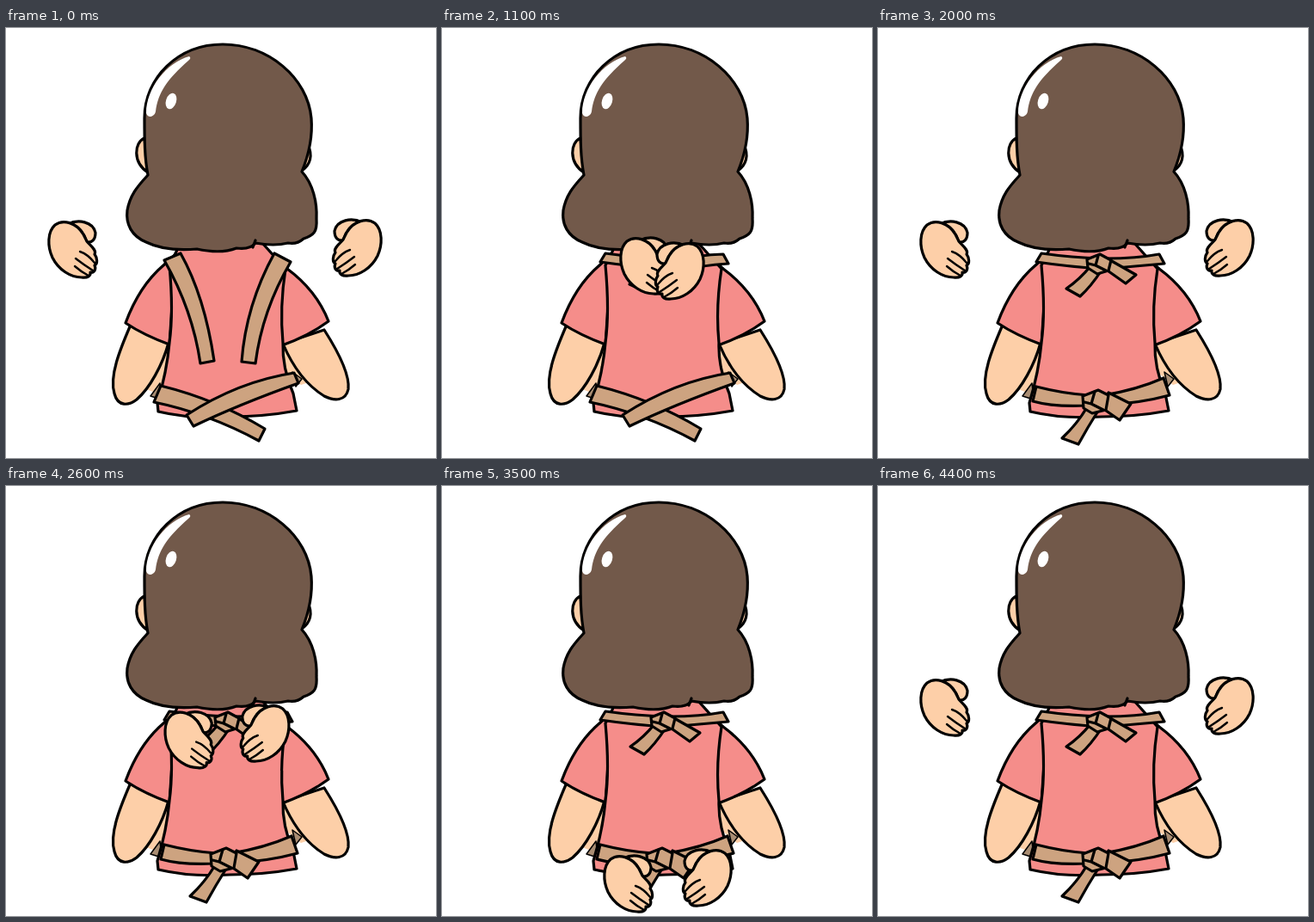
Write an HTML page that moves like this. It is 500 px wide and 500 px high and loops after 4.8 s.

```html
<!DOCTYPE html>
<html lang="en">
<head>
<meta charset="utf-8">
<title>Tying an apron</title>
<style>
  html, body { margin: 0; width: 100%; height: 100%; overflow: hidden; background: #fff; }
  svg { display: block; width: 100vw; height: 100vh; }
  .skin { fill: #fdcfa8; }
  .shirt { fill: #f58d8a; }
  .hair { fill: #72594a; }
  .strap { fill: #cda380; }
  .shade { fill: #a98d73; }
  .line { fill: none; }
</style>
</head>
<body>
<svg viewBox="0 0 500 500" stroke="#000" stroke-width="3.2" stroke-linejoin="round" stroke-linecap="round">
  <defs>
    <g id="hand" class="skin">
      <path d="M72 228C84 222 101 225 104 238C104 246 100 250 94 249Z"/>
      <path d="M90 240C82 226 66 222 57 229C48 237 48 254 54 267C61 281 75 290 88 290C95 291 99 288 98 284C103 285 105 280 103 276C107 274 106 267 103 263C106 258 97 252 94 248Z"/>
      <path class="line" stroke-width="2.4" d="M78 228Q90 234 94 248M86 260Q95 263 103 273M81 268Q90 275 101 282M80 277Q88 284 96 288"/>
    </g>
  </defs>

  <!-- arms -->
  <g class="skin">
    <path d="M188 365L190 400L176 425L163 420Z" stroke="none"/>
    <path d="M322 365L322 398L343 415L352 412Z" stroke="none"/>
    <path class="shade" d="M179 413L168 428L181 432Z" stroke-width="1.5"/>
    <path class="shade" d="M333 400L344 408L337 417Z" stroke-width="1.5"/>
    <path d="M145 345C132 375 120 405 126 425C130 441 143 439 152 432C167 419 182 392 189 366Z"/>
    <path d="M370 351C386 376 400 402 398 420C395 434 382 434 370 428C349 415 333 393 322 367Z"/>
  </g>

  <!-- shirt -->
  <g class="shirt">
    <path d="M205 256L183 276C163 293 149 316 139 343Q160 357 190 368L196 280Z"/>
    <path d="M300 256L327 280C350 297 366 318 375 341Q352 358 321 369L318 280Z"/>
    <path d="M203 250L190 276Q195 330 190 366Q187 400 176 436L177 446Q215 455 260 452Q300 452 338 445L334 425Q321 395 322 366Q318 325 325 280L298 250Z"/>
  </g>

  <!-- loose waist straps -->
  <g id="loose" class="strap">
    <path d="M180 416Q245 432 301 466L294 480Q235 448 172 435Z"/>
    <path d="M335 401Q270 411 210 450L218 463Q270 438 340 413Z"/>
  </g>

  <path id="leftStrap" class="strap"/>
  <path id="rightStrap" class="strap"/>

  <!-- bows -->
  <g id="bows" class="strap">
    <path d="M184 417Q215 425 245 427L243 439Q205 441 180 434Z"/>
    <path d="M262 427Q300 421 332 407L339 427Q302 437 264 438Z"/>
    <path d="M243 441Q232 460 214 477L233 484Q244 464 256 445Z"/>
    <path d="M258 440L281 456L294 437L268 424Z"/>
    <path d="M238 428L256 421L268 427L265 444L249 448L239 442Z"/>
    <path class="line" d="M252 423L248 437L262 444M248 437L240 435"/>
    <path d="M247 277Q235 292 219 303L235 312Q248 300 259 283Z"/>
    <path d="M264 280L288 297L300 287L270 270Z"/>
    <path d="M243 269L258 263L271 270L268 282L255 286L244 279Z"/>
    <path class="line" d="M256 265L253 276L265 282M253 276L245 274"/>
  </g>

  <!-- head -->
  <path class="skin" d="M161 128C149 133 147 156 165 168Z"/>
  <path class="skin" d="M351 136C357 148 354 159 344 166Z"/>
  <path class="hair" d="M252 19C305 19 351 58 355 105C357 130 351 150 344 167C357 181 362 203 361 222C362 237 358 241 346 245Q338 252 328 250Q312 254 290 250Q284 258 268 256Q250 263 222 257Q185 260 163 249C146 242 139 228 141 212C144 195 152 185 165 171C161 150 161 130 161 105C161 58 200 19 252 19Z"/>
  <path class="line" d="M290 247L287 255"/>
  <g fill="#fff" stroke="none">
    <path d="M213 33C187 40 163 70 163 99C165 106 173 103 174 97C177 75 187 60 212 38Q216 35 213 33Z"/>
    <ellipse cx="192" cy="85" rx="6" ry="9.5" transform="rotate(18 192 85)"/>
  </g>

  <use id="leftHand" href="#hand"/>
  <use id="rightHand" href="#hand"/>
</svg>

<script>
const LOOP = 4800, STEP = 100, TIED_AT = 1600;
const $ = id => document.getElementById(id);
const mix = (a, b, k) => a + (b - a) * k;

// time, left hand offset, right hand offset (both from the resting place)
const rest = [0, 0, 0, 0], grip = [129, 64, -97, 67], neck = [158, 19, -132, 27],
      knot = [169, 47, -134, 40], waist = [139, 205, -100, 200], apart = [116, 174, -87, 167];
const moves = [
  [0, rest], [500, grip], [600, grip], [1100, neck], [1500, neck], [2000, rest],
  [2200, rest], [2700, knot], [2900, knot], [3500, waist], [3900, apart], [4400, rest], [LOOP, rest]
];

// corner, corner, bend, end, end, bend: hanging, then drawn together
const straps = {
  leftStrap: [[184, 270, 203, 262, 231, 312, 242, 387, 226, 390, 217, 328],
              [184, 272, 190, 262, 225, 267, 262, 268, 262, 280, 225, 278]],
  rightStrap: [[331, 272, 312, 262, 279, 322, 274, 388, 290, 390, 298, 328],
               [333, 274, 327, 263, 268, 264, 218, 298, 236, 306, 268, 277]]
};
const tied = {
  leftStrap: straps.leftStrap[1],
  rightStrap: [333, 274, 327, 263, 300, 268, 265, 268, 265, 280, 300, 277]
};

function strapPath([a, b, c, d, e, f, g, h, i, j, k, l]) {
  return `M${a} ${b}L${c} ${d}Q${e} ${f} ${g} ${h}L${i} ${j}Q${k} ${l} ${a} ${b}Z`;
}

function handsAt(t) {
  const n = moves.findIndex(([end]) => end > t);
  const [t0, from] = moves[n - 1], [t1, to] = moves[n];
  return from.map((v, i) => mix(v, to[i], (t - t0) / (t1 - t0)));
}

function draw(now) {
  const t = Math.floor(now % LOOP / STEP) * STEP;
  const [lx, ly, rx, ry] = handsAt(t);
  $('leftHand').setAttribute('transform', `translate(${lx} ${ly})`);
  $('rightHand').setAttribute('transform', `translate(${486 + rx} ${ry - 2}) scale(-1 1)`);

  const isTied = t >= TIED_AT;
  const pull = Math.min(1, Math.max(0, (t - 600) / 500));
  for (const id in straps) {
    const [hanging, drawn] = straps[id];
    const points = isTied ? tied[id] : hanging.map((v, i) => mix(v, drawn[i], pull));
    $(id).setAttribute('d', strapPath(points));
  }
  $('loose').style.display = isTied ? 'none' : '';
  $('bows').style.display = isTied ? '' : 'none';
}

const start = performance.now();
function tick() {
  draw(performance.now() - start);
  requestAnimationFrame(tick);
}
tick();
</script>
</body>
</html>
```
